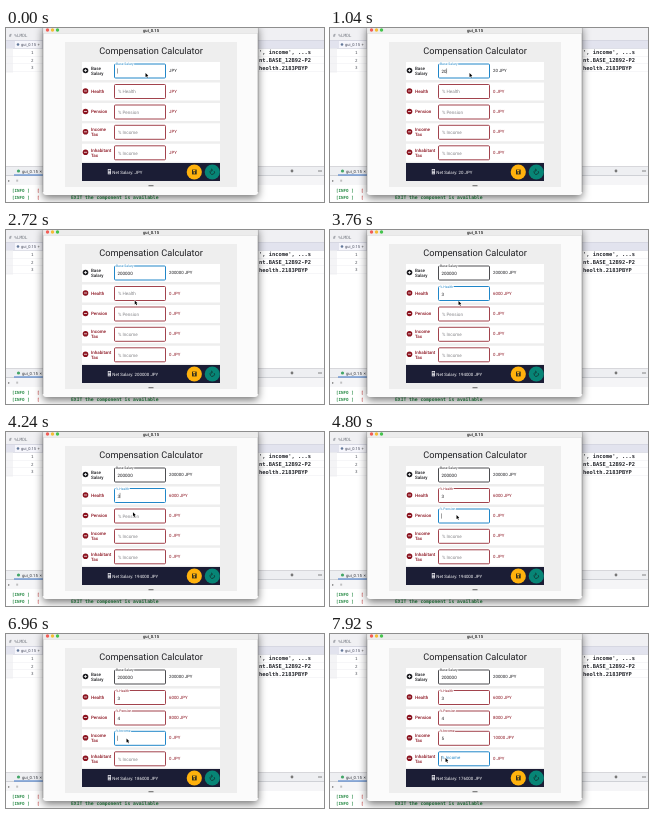
These frames come from a looping animation (318x174 px, 8000 ms). An HTML page with a canvas:

```html
<!DOCTYPE html>
<html lang="en">
<head>
<meta charset="utf-8">
<title>Compensation Calculator</title>
<style>
html, body { margin: 0; width: 100%; height: 100%; overflow: hidden; background: #fff; }
canvas { display: block; width: 318px; height: 174px; }
</style>
</head>
<body>
<canvas id="stage"></canvas>
<script>
const W = 318, H = 174, LOOP = 8000;
const canvas = document.getElementById('stage');
const g = canvas.getContext('2d');
const dpr = window.devicePixelRatio || 1;
canvas.width = W * dpr;
canvas.height = H * dpr;

const SANS = 'Roboto, Arial, sans-serif';
const MONO = '"DejaVu Sans Mono", monospace';
const RED = '#8b1420', INK = '#202024', BLUE = '#2086c8', NAVY = '#1b1d35';

// typed: [time, value]; focus and blur in ms
const rows = [
  { name: ['Base', 'Salary'], hint: 'Base Salary', y: 43, focus: -400, blur: 2800,
    typed: [[880, '2'], [1040, '20'], [1120, '200'], [1200, '2000'], [1360, '20000'], [1600, '200000']] },
  { name: ['Health'], hint: '% Health', y: 63.5, focus: 2800, blur: 4460, typed: [[3600, '3']] },
  { name: ['Pension'], hint: '% Pension', y: 84, focus: 4460, blur: 5620, typed: [[5200, '4']] },
  { name: ['Income', 'Tax'], hint: '% Income', y: 104.3, focus: 5620, blur: 7860, typed: [[7200, '5']] },
  { name: ['Inhabitant', 'Tax'], hint: '% Income', y: 124.8, focus: 7860, blur: 9999, typed: [] }
];

// pointer moves: [start, end, x, y]
const moves = [[0, 1, 140, 45], [2100, 2780, 129, 71], [3840, 4420, 127, 83],
  [5280, 5600, 121, 104.5], [7360, 7800, 116, 124]];

const clamp = v => Math.max(0, Math.min(1, v));
const ease = v => { v = clamp(v); return v * v * (3 - 2 * v); };
const mix = (a, b, k) => a + (b - a) * k;

function rect(x, y, w, h, color) {
  g.fillStyle = color;
  g.fillRect(x, y, w, h);
}

function disc(x, y, r, color) {
  g.fillStyle = color;
  g.beginPath();
  g.arc(x, y, r, 0, Math.PI * 2);
  g.fill();
}

function line(color, width, ...p) {
  g.strokeStyle = color;
  g.lineWidth = width;
  g.beginPath();
  for (let i = 0; i < p.length; i += 2) g.lineTo(p[i], p[i + 1]);
  g.stroke();
}

function text(s, x, y, size, color, { font = SANS, align = 'left', weight = 400 } = {}) {
  g.font = `${weight} ${size}px ${font}`;
  g.textAlign = align;
  g.fillStyle = color;
  g.fillText(s, x, y);
}

function backdrop() {
  const mono = { font: MONO }, bold = { font: MONO, weight: 700 };
  rect(0, 0, W, H, '#fff');
  rect(0, 0, W, 12, '#f0f0f3');
  rect(0, 12, W, 8.5, '#e2e3ee');
  rect(0, 12, W, 0.6, '#cfd0da');
  rect(0, 20, W, 0.6, '#d4d5df');
  text('# %LMDL', 3, 9, 4.4, '#777b84', mono);
  rect(9, 13, 27, 7, '#f6f6fc');
  disc(12, 16.5, 1.3, '#63789a');
  text('gui_0.15', 15, 18, 4, '#44485a');
  text('+', 31.5, 18, 4, '#555');
  rect(0, 20.6, 7, 24, '#f4f4f6');
  for (let i = 0; i < 3; i++) {
    const y = 26 + i * 7.5;
    text(i + 1, 25, y, 4.2, '#565a62', mono);
    rect(0, y + 2, W, 0.4, '#e8e9ee');
  }
  text("', income', ...s", 253, 26, 5.4, '#25272d', bold);
  text('nt.BASE_12B92-P2', 253, 34, 5.4, '#25272d', bold);
  text('heolth.2183PBYP', 253, 41.5, 5.4, '#25272d', bold);
  rect(0, 138, W, 10, '#eeeff2');
  rect(0, 138, W, 0.6, '#c8c9ce');
  rect(0, 147.2, W, 0.8, '#c9cad0');
  disc(12.5, 143, 1.6, '#43a668');
  text('gui_0.15', 16, 145, 4.2, '#33363d');
  text('×', 33.5, 145, 4.5, '#33363d');
  rect(8, 146.4, 29, 1.2, '#5688d0');
  disc(286, 143, 1.4, '#777');
  line('#666', 0.8, 312, 143, 316, 143);
  rect(0, 148, W, 9, '#f5f5f7');
  text('▸', 2, 154, 4, '#777');
  text('≡', 10, 154, 4, '#777');
  text('[INFO ]', 6, 164, 4.2, '#278a45', bold);
  text('[', 31, 164, 4.2, '#bd3434', bold);
  text('[INFO ]', 6, 171, 4.2, '#278a45', bold);
  text('[', 31, 171, 4.2, '#bd3434', bold);
  text('EXIT the component is available', 65, 171, 4.7, '#278a45', bold);
}

function frameWindow() {
  g.save();
  g.shadowColor = 'rgba(0,0,0,.55)';
  g.shadowBlur = 9 * dpr;
  g.shadowOffsetY = 3 * dpr;
  g.fillStyle = '#fbfbfb';
  g.beginPath();
  g.roundRect(37, -3, 215, 170, 3);
  g.fill();
  g.restore();
  line('#777', 0.5, 37, 0, 37, 164);
  line('#777', 0.5, 252, 0, 252, 164);
  rect(37.3, 0, 214.4, 5, '#ececec');
  rect(37.3, 5, 214.4, 0.5, '#d0d0d0');
  ['#f25d56', '#f5bd35', '#45c34d'].forEach((c, i) => disc(41.5 + i * 5, 2, 1.7, c));
  text('gui_0.15', 145, 3.7, 4.2, '#333', { align: 'center', weight: 700 });
  rect(59, 14, 172, 145, '#eeeeee');
  text('Compensation Calculator', 145, 26.3, 9.2, INK, { align: 'center' });
}

const valueAt = (row, t) => row.typed.reduce((v, [at, s]) => t >= at ? s : v, '');

function field(row, i, t, value) {
  const on = t >= row.focus && t < row.blur;
  const base = i ? RED : INK;
  const color = on ? BLUE : base;
  const x = 108.5, top = row.y - 7, h = 14;
  const up = ease((t - row.focus) / 200);
  g.strokeStyle = color;
  g.lineWidth = on ? 1 : 0.8;
  g.beginPath();
  g.roundRect(x, top, 51, h, 1);
  g.stroke();
  const size = mix(4.6, 3.4, up);
  const ly = mix(row.y + 1.8, top + 1.1, up);
  const lx = mix(112, 110, up);
  g.font = `${size}px ${SANS}`;
  if (up > 0.5) rect(lx - 0.5, top - 1, g.measureText(row.hint).width + 1, 2, '#fff');
  text(row.hint, lx, ly, size, up > 0 ? color : '#86868a');
  if (value) text(value, 111.5, row.y + 2, 4.5, INK);
  if (on && (t - row.focus) % 1060 < 530) {
    g.font = `4.5px ${SANS}`;
    const cx = 111.5 + g.measureText(value).width;
    line('#444', 0.5, cx, row.y - 2.6, cx, row.y + 2.6);
  }
}

function drawRow(row, i, t, base) {
  const color = i ? RED : INK, y = row.y;
  rect(76, y - 9, 138, 18, '#fff');
  disc(79.5, y - 0.5, 2.8, color);
  line('#fff', 0.7, 78, y - 0.5, 81, y - 0.5);
  if (!i) line('#fff', 0.7, 79.5, y - 2, 79.5, y + 1);
  const two = row.name.length > 1;
  row.name.forEach((s, n) =>
    text(s, 85, y + (two ? -1 + n * 5 : 1), 4.5, color, { weight: 500 }));
  const value = valueAt(row, t);
  field(row, i, t, value);
  const amount = i ? base * value / 100 : base;
  text((base ? amount + ' ' : '') + 'JPY', 163, y + 1, 4.35, color);
  return amount;
}

function footer(net) {
  rect(76, 135, 138, 18, NAVY);
  rect(101.8, 141, 3.2, 5.3, '#e9e9ee');
  rect(102.4, 141.8, 2, 1, NAVY);
  rect(102.4, 143.6, 2, 0.5, NAVY);
  rect(102.4, 144.9, 2, 0.5, NAVY);
  text('Net Salary: ' + (net ? net + ' ' : '') + 'JPY', 106.3, 145.5, 4.4, '#f3f3f5');
  disc(188.3, 144, 7.6, '#ffb20d');
  rect(186, 141.6, 4.7, 4.8, '#33301f');
  rect(187, 142, 2.3, 1.4, '#ffb20d');
  disc(188.3, 144.9, 0.8, '#ffb20d');
  disc(206.3, 144, 7.6, '#078576');
  g.strokeStyle = '#12302f';
  g.lineWidth = 0.8;
  g.beginPath();
  g.arc(206.3, 144.2, 2.2, -0.5, 4.4);
  g.stroke();
  line('#12302f', 0.8, 205, 140.8, 206.6, 142.1, 205.2, 143.4);
  rect(142.5, 157.3, 5, 0.9, '#555');
}

function pointer(t) {
  let [, , x, y] = moves[0];
  for (const [a, b, nx, ny] of moves) {
    const k = ease((t - a) / (b - a));
    x = mix(x, nx, k);
    y = mix(y, ny, k);
  }
  g.beginPath();
  for (const [dx, dy] of [[0, 0], [0, 4], [0.9, 3.2], [1.6, 4.7], [2.3, 4.4], [1.6, 2.9], [2.8, 2.8]])
    g.lineTo(x - 0.5 + dx, y + dy);
  g.closePath();
  g.strokeStyle = '#fff';
  g.lineWidth = 0.8;
  g.stroke();
  g.fillStyle = '#000';
  g.fill();
}

function draw(t) {
  g.setTransform(dpr, 0, 0, dpr, 0, 0);
  g.textRendering = 'geometricPrecision';
  backdrop();
  frameWindow();
  const base = +valueAt(rows[0], t);
  let net = base;
  rows.forEach((row, i) => {
    const amount = drawRow(row, i, t, base);
    if (i) net -= amount;
  });
  footer(net);
  pointer(t);
}

const start = performance.now();
function tick(now) {
  draw(Math.max(0, now - start) % LOOP);
  requestAnimationFrame(tick);
}
draw(0);
requestAnimationFrame(tick);
</script>
</body>
</html>
```
